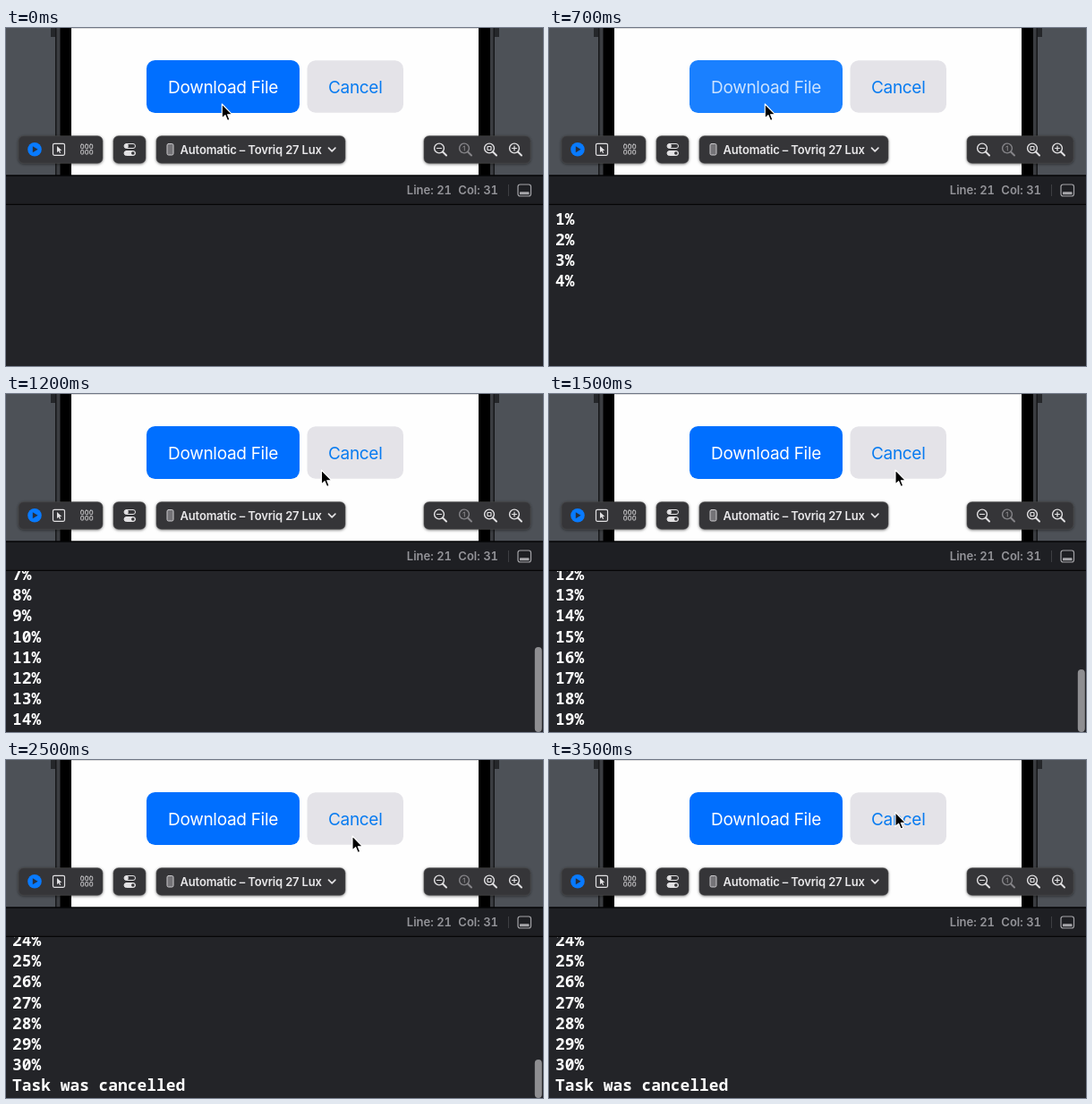
Recreate the animation shown at these times as an HTML page. Size 600x378 px, loop 3600 ms.

```html
<!DOCTYPE html>
<html lang="en">
<head>
<meta charset="utf-8">
<title>Download and cancel</title>
<style>
  html, body { margin: 0; width: 100%; height: 100%; overflow: hidden; background: #232428; }
  svg { display: block; width: 600px; height: 378px; }
  text { font-family: Inter, Roboto, sans-serif; white-space: pre; }
  .button { font-size: 19px; letter-spacing: -.3px; text-anchor: middle; }
  .device { font-size: 13px; font-weight: 600; letter-spacing: -.15px; fill: #e9e8ea; }
  .status { font-size: 13px; font-weight: 600; fill: #949499; font-variant-numeric: tabular-nums; }
  #log text { font: 700 17.9px "Noto Sans Mono", "DejaVu Sans Mono", monospace; fill: #fff; }
  .icon { fill: none; stroke: #e2e1e3; stroke-width: 1.2; stroke-linecap: round; stroke-linejoin: round; }
</style>
</head>
<body>
<svg viewBox="0 0 600 378">
  <defs>
    <clipPath id="console"><rect y="198" width="600" height="180"/></clipPath>
    <filter id="shadow" x="-10%" y="-30%" width="120%" height="160%">
      <feDropShadow dx="0" dy=".8" stdDeviation="1.8" flood-opacity=".5"/>
    </filter>
    <g id="lens" stroke-width="1.4"><circle r="5.4"/><path d="M4 4L8 8" stroke-width="2"/></g>
  </defs>

  <rect width="600" height="165" fill="#4d5157"/>
  <path d="M50 0h5v10h-5zM546 0h5v10h-5z" fill="#25272a"/>
  <rect x="55" width="491" height="165" fill="#17181a"/>
  <rect x="56.500" width="488" height="165" fill="#3b3d41"/>
  <rect x="60.500" width="480.500" height="165"/>
  <rect x="73" width="455" height="165" fill="#fefefe"/>
  <rect x="73" width="455" height="1" fill="#dcdcdd"/>

  <rect id="download" x="157" y="36" width="171" height="59" rx="9.500"/>
  <text id="downloadLabel" class="button" x="242.500" y="72.500" fill="#fff">Download File</text>
  <rect x="336.500" y="36.200" width="107.500" height="58.600" rx="9.500" fill="#e4e3e8"/>
  <text id="cancelLabel" class="button" x="390.200" y="72.500" fill="#087bf0">Cancel</text>

  <g id="pills" filter="url(#shadow)" fill="#363538" stroke="#49484b" stroke-width=".6"></g>

  <circle cx="32" cy="135.700" r="7.800" fill="#087aff"/>
  <path d="M29.800 132.200v7l5.800-3.500z" fill="#28303d"/>
  <g class="icon">
    <rect x="52.500" y="129.300" width="13" height="13" rx="1.500"/>
    <path d="M57 132v7.200l1.800-1.600 1.200 2.500 1.200-.6-1.200-2.400h2.300z" fill="#e2e1e3" stroke="none"/>
    <g id="grid" stroke-width="1" stroke="#c4c3c6"></g>
    <rect x="132" y="129.500" width="12.500" height="5" rx="2.500" stroke-width="1"/>
    <circle cx="134.500" cy="132" r="2.400" fill="#e2e1e3" stroke="none"/>
    <rect x="132" y="137.500" width="12.500" height="5" rx="2.500" fill="#e2e1e3" stroke-width="1"/>
    <circle cx="141.800" cy="140" r="1.800" fill="#363538" stroke="none"/>
    <rect x="180" y="129.500" width="7" height="12.500" rx="1.600" fill="#747377" stroke="#c9c8cb" stroke-width="1"/>
    <path d="M360.500 134.200l3.700 3.600 3.700-3.600" stroke-width="1.700"/>
    <g transform="translate(484 134.500)"><use href="#lens"/><path d="M-2.500 0h5"/></g>
    <g transform="translate(512 134.500)" stroke="#858488"><use href="#lens"/><path d="M-1.200-1.500L.3-2.600V2.500" stroke-width="1"/></g>
    <g transform="translate(540 134.500)"><use href="#lens"/><rect x="-2" y="-2" width="4" height="4" rx=".5"/></g>
    <g transform="translate(568 134.500)"><use href="#lens"/><path d="M-2.500 0h5M0-2.500v5"/></g>
  </g>
  <text class="device" x="194.500" y="140.600">Automatic – Tovriq 27 Lux</text>

  <rect y="165" width="600" height="33" fill="#1e1f23"/>
  <path d="M0 165h600M0 197.500h600" stroke="#050506" stroke-width="1.400"/>
  <text class="status" x="447.800" y="186.400">Line: 21</text>
  <text class="status" x="505.300" y="186.400">Col: 31</text>
  <path d="M561.500 175v13" stroke="#3d3e42"/>
  <rect x="572" y="175" width="14.500" height="13" rx="2.500" fill="none" stroke="#a5a5a9" stroke-width="1.200"/>
  <rect x="574" y="183.300" width="10.500" height="3" rx=".6" fill="#a5a5a9"/>

  <rect y="198" width="600" height="180" fill="#232428"/>
  <g clip-path="url(#console)"><g id="log"></g></g>
  <rect id="thumb" x="590.800" width="8" rx="4" fill="#8e8e91"/>

  <path id="pointer" d="M0 0V16L3.700 12.600 6.200 18.600 8.700 17.500 6.300 11.700H11.300Z" stroke="#fff" stroke-width="1.100" stroke-linejoin="round"/>
</svg>
<script>
const LOOP = 3600, STEP = 100, LINE = 23.2, LAST_BASELINE = 370.4, FIRST_BASELINE = 219.5;
const CANCELLED = 31;
// Lines printed at each step, from 500 ms on.
const printed = [0, 2, 4, 6, 7, 10, 12, 14, 16, 17, 19, 21, 23, 23, 25, 27, 28, 29, 30, 31];

const $ = id => document.getElementById(id);
const clamp = v => Math.max(0, Math.min(1, v));
const smooth = v => { const u = clamp(v); return u * u * (3 - 2 * u); };
const mix = (a, b, u) => a + (b - a) * u;

function add(parent, tag, attrs) {
  const node = document.createElementNS("http://www.w3.org/2000/svg", tag);
  for (const key in attrs) node.setAttribute(key, attrs[key]);
  return parent.appendChild(node);
}

for (const [x, width] of [[14, 94], [120, 36], [168, 211], [467, 119]])
  add($("pills"), "rect", { x, y: 120.8, width, height: 30.4, rx: 5.5 });

for (let i = 0; i < 6; i++)
  add($("grid"), "rect", { x: 83.7 + (i % 3) * 5, y: 130.2 + Math.floor(i / 3) * 6.4, width: 3, height: 4.4, rx: 0.7 });

const rows = Array.from({ length: 8 }, () => add($("log"), "text", { x: 7 }));

function drawLog(count) {
  const scrolled = count > 7;
  const first = scrolled ? count - 7 : 1;
  const top = scrolled ? LAST_BASELINE - 7 * LINE : FIRST_BASELINE;
  rows.forEach((row, i) => {
    const n = first + i;
    row.textContent = n > count ? "" : n === CANCELLED ? "Task was cancelled" : n + "%";
    row.setAttribute("y", top + i * LINE);
  });
  const height = scrolled ? 1330 / count : 0;
  $("thumb").setAttribute("height", height);
  $("thumb").setAttribute("y", 378 - height);
}

function draw(time) {
  const t = Math.floor((time % LOOP) / STEP) * STEP;

  const press = t < 400 ? 0 : 1 - smooth((t - 500) / 400);
  $("download").setAttribute("fill", `rgb(${mix(0, 51, press)},${mix(111, 144, press)},255)`);
  $("downloadLabel").setAttribute("fill-opacity", mix(1, 0.55, press));
  $("cancelLabel").setAttribute("fill-opacity", t === 2200 || t === 2300 ? 0.6 : 1);

  const index = (t - 500) / STEP;
  drawLog(index < 0 ? 0 : printed[Math.min(index, printed.length - 1)]);
  $("thumb").setAttribute("opacity", 1 - clamp((t - 2500) / 400));

  const x = mix(241.3, 387, smooth((t - 790) / 600));
  const y = t >= 3500 ? 58.5 : 85;
  $("pointer").setAttribute("transform", `translate(${x} ${y})`);
}

const start = performance.now();
function tick() {
  draw(performance.now() - start);
  requestAnimationFrame(tick);
}
tick();
</script>
</body>
</html>
```
